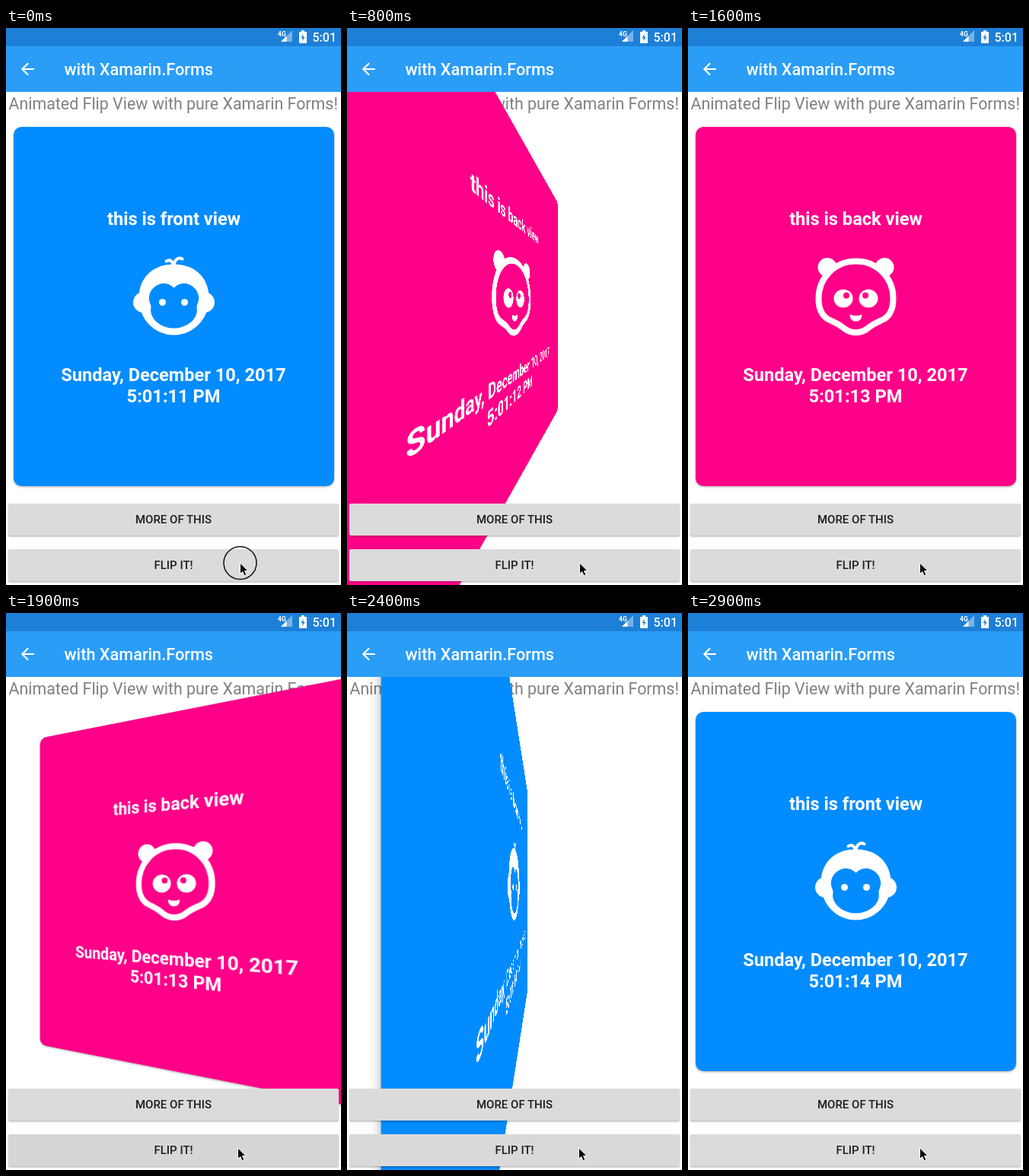
Recreate the animation shown at these times as an HTML page. Size 440 by 732 pixels, loop 3 s.

```html
<!DOCTYPE html>
<html lang="en">
<head>
<meta charset="utf-8">
<title>Flip view</title>
<style>
  html, body { margin: 0; width: 100%; height: 100%; overflow: hidden; background: #fff; }
  body { position: relative; font-family: Roboto, sans-serif; }
  .layer { position: absolute; left: 0; top: 0; width: 440px; height: 732px; }
  #scene {
    position: absolute; left: 0; top: 84px; width: 440px; height: 648px;
    overflow: hidden; perspective: 252px; perspective-origin: 220px 281.5px;
  }
  #card {
    position: absolute; left: 9.5px; top: 45.5px; width: 421px; height: 472px;
    border-radius: 10.5px; box-shadow: 0 1px 3px rgba(0, 0, 0, .35);
  }
  #card svg { display: block; width: 421px; height: 472px; }
  .button {
    position: absolute; left: 3px; width: 434px; height: 42px; border-radius: 2px;
    background: #dbdbdb; color: #1e1e1e; box-shadow: 0 1.5px 2px rgba(0, 0, 0, .28);
    font-size: 15px; font-weight: 500; line-height: 42px; text-align: center;
  }
  text { font-family: Roboto, sans-serif; }
</style>
</head>
<body>
<svg class="layer" viewBox="0 0 440 732">
  <text x="3.5" y="107" font-size="21.4" fill="#808080">Animated Flip View with pure Xamarin Forms!</text>
</svg>

<div id="scene">
  <div id="card">
    <svg viewBox="9.5 129.5 421 472" fill="#fff">
      <g id="front">
        <path d="M219 313C219 306 215 303 210 306M220 313C220 304 226 300 231 303"
              fill="none" stroke="#fff" stroke-width="4" stroke-linecap="round"/>
        <circle cx="180" cy="360" r="13.5"/>
        <circle cx="260" cy="360" r="13.5"/>
        <path d="M220 310C248 310 266 328 266 354C266 384 244 403 220 403
          C196 403 174 384 174 354C174 328 192 310 220 310Z"/>
        <path fill="#038cff" d="M220 341C214 335 206 333 199 337C188 342 185 354 189 362C191 366 189 369 190 374
          C193 386 206 394 220 394C234 394 247 386 250 374C251 369 249 366 251 362
          C255 354 252 342 241 337C234 333 226 335 220 341Z"/>
        <circle cx="205" cy="360" r="4.5"/>
        <circle cx="234" cy="360" r="4.5"/>
      </g>
      <g id="back">
        <circle cx="182.5" cy="314" r="12.5"/>
        <circle cx="257.5" cy="314" r="12.5"/>
        <path fill="#ff0088" stroke="#fff" stroke-width="8" stroke-linejoin="round"
          d="M220 306C248 306 269 328 269 355C269 367 265 377 257 382C249 386 243 388 237 393
          C227 402 213 402 203 393C197 388 191 386 183 382C175 377 171 367 171 355C171 328 192 306 220 306Z"/>
        <ellipse cx="203.5" cy="355" rx="12.5" ry="12"/>
        <ellipse cx="236.5" cy="355" rx="12.5" ry="12"/>
        <circle cx="207.5" cy="351" r="4" fill="#ff0088"/>
        <circle cx="232.5" cy="351" r="4" fill="#ff0088"/>
        <path d="M212 376Q220 379 228 376Q228 385 220 385Q212 385 212 376Z"/>
      </g>
      <g font-size="23.6" font-weight="700" text-anchor="middle">
        <text id="caption" x="220" y="258.7"></text>
        <text x="219.500" y="463">Sunday, December 10, 2017</text>
        <text id="time" x="219.500" y="491"></text>
      </g>
    </svg>
  </div>
</div>

<div class="button" style="top:625px">MORE OF THIS</div>
<div class="button" style="top:685px" id="flip">FLIP IT!</div>

<svg class="layer" viewBox="0 0 440 732" fill="#fff">
  <rect width="440" height="24" fill="#1e7fd7"/>
  <rect y="24" width="440" height="60" fill="#2a9df7"/>
  <text x="357" y="11" font-size="8.5" font-weight="700">4G</text>
  <path d="M376 3V18H361Z" opacity=".4"/>
  <path d="M368.500 10.500V18H361Z"/>
  <path d="M388 3h4v2h3v15h-10V5h3Z"/>
  <path d="M390.500 8l-3 5h2v4l3-5h-2Z" fill="#1e7fd7"/>
  <text x="402.500" y="17.500" font-size="16" font-weight="500">5:01</text>
  <path transform="translate(15.500 41.200) scale(1.07)"
    d="M20 11H7.830l5.590-5.590L12 4l-8 8 8 8 1.410-1.410L7.830 13H20Z"/>
  <text x="76.500" y="62" font-size="21.7" font-weight="500">with Xamarin.Forms</text>
  <g id="pointer">
    <circle id="touch" r="21.5" fill="none" stroke="#111" stroke-width="1.5"/>
    <path d="M0 0V14.500L3.300 11.500L5.600 16.800L8.300 15.600L6 10.500H10.500Z" fill="#000" stroke="#fff"/>
  </g>
</svg>

<script>
  const LOOP = 3000, STEP = 100, HALF_TURN = 500;
  const FIRST_TICK = 350;
  // Each flip turns the card edge-on, swaps the face, then turns it flat again.
  const flips = [
    { touch: 0, out: 97, back: 645 },
    { touch: 1700, out: 1834, back: 2353 }
  ];
  const el = id => document.getElementById(id);
  const clamp = x => Math.min(1, Math.max(0, x));
  const ramp = (t, from, to) => clamp((t - from) / (to - from));

  function angleAt(t) {
    const flip = t < flips[1].out ? flips[0] : flips[1];
    return t < flip.back
      ? -90 * ramp(t, flip.out, flip.out + HALF_TURN)
      : 90 * (1 - ramp(t, flip.back, flip.back + HALF_TURN));
  }

  function pressAt(t) {
    return Math.max(...flips.map(({ out }) =>
      ramp(t, out, out + 100) * (1 - ramp(t, out + 450, out + 600))));
  }

  function draw(t) {
    const isFront = t < flips[0].back || t >= flips[1].back;
    const angle = angleAt(t);
    const card = el("card");
    card.style.background = isFront ? "#038cff" : "#ff0088";
    card.style.transform = angle ? `rotateY(${angle}deg)` : "none";
    el("front").style.display = isFront ? "" : "none";
    el("back").style.display = isFront ? "none" : "";
    el("caption").textContent = `this is ${isFront ? "front" : "back"} view`;
    const seconds = 12 + Math.floor((t - FIRST_TICK) / 1000);
    el("time").textContent = `5:01:${seconds} PM`;

    const gray = Math.round(219 - 7 * pressAt(t));
    el("flip").style.background = `rgb(${gray},${gray},${gray})`;
    const x = 307.5 - 3 * ramp(t, 600, 900);
    el("pointer").setAttribute("transform", `translate(${x} 703)`);
    const touching = flips.some(({ touch, out }) => t >= touch && t < out);
    el("touch").style.display = touching ? "" : "none";
  }

  const start = performance.now();
  function tick() {
    const t = (performance.now() - start) % LOOP;
    draw(Math.floor(t / STEP) * STEP);
    requestAnimationFrame(tick);
  }
  tick();
</script>
</body>
</html>
```
